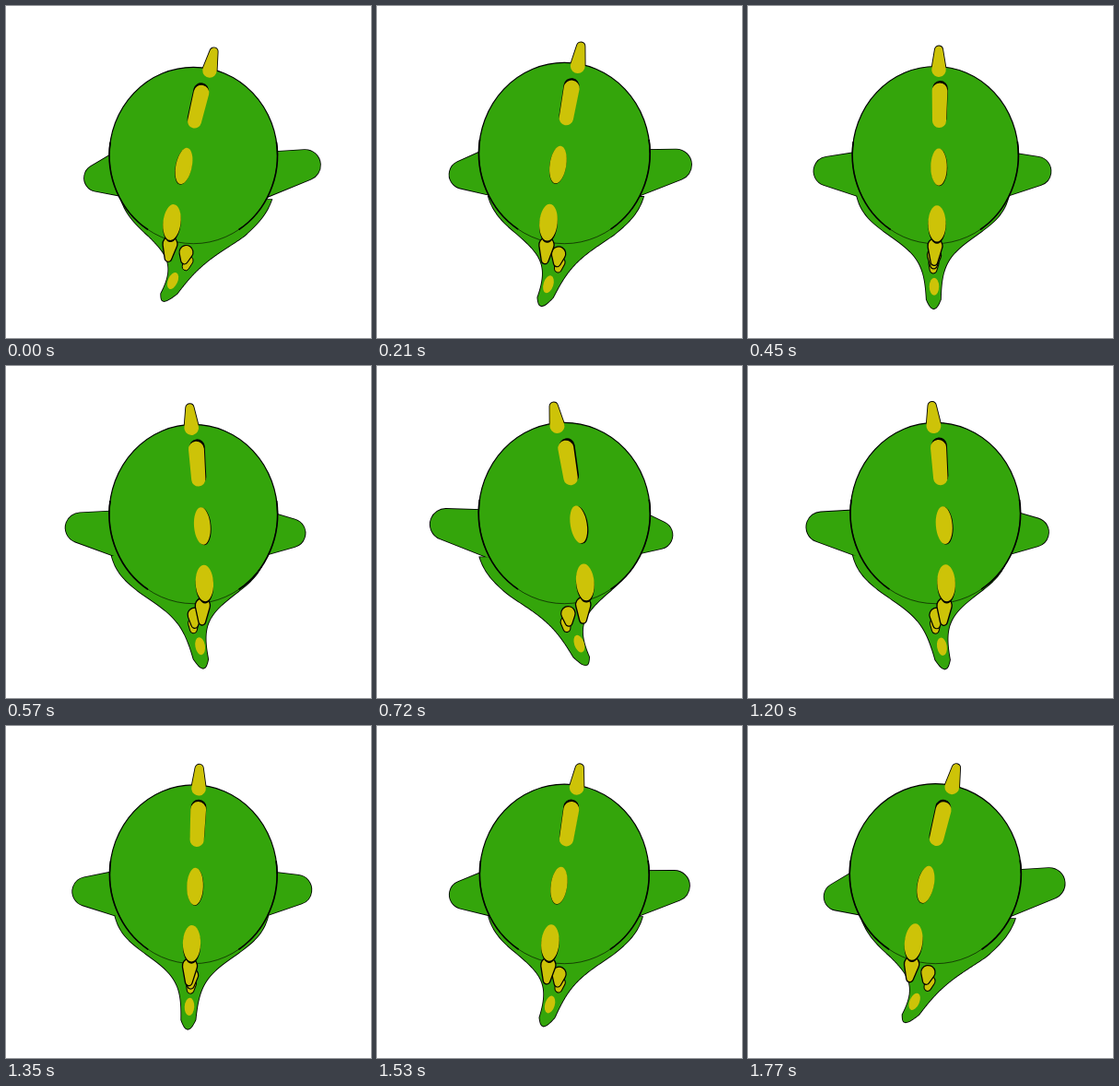
These frames come from a looping animation (396 px wide and 360 px high, 1.9 s). An HTML page with a canvas:

```html
<!DOCTYPE html>
<html>
<head>
<meta charset="utf-8">
<style>
html, body { margin: 0; width: 100%; height: 100%; overflow: hidden; background: #fff; }
canvas { display: block; }
</style>
</head>
<body>
<canvas id="stage" width="396" height="360"></canvas>
<script>
const ctx = document.getElementById('stage').getContext('2d');
const GREEN = '#34a50b', YELLOW = '#cdc308', BLACK = '#000';
const { PI, sin, cos, sqrt, abs, min, max, exp } = Math;

// Turn of the body: 1 is right, -1 is left.
let turn = 1;

// Place of a point on the back: x moves with the turn, y with its square.
const onBack = (x, y, swing, drop = 0) => [x + swing * turn, y + drop * turn * turn];

// Hull of two circles.
function taper([x1, y1], r1, [x2, y2], r2) {
  const dir = Math.atan2(y2 - y1, x2 - x1);
  const open = Math.acos((r1 - r2) / Math.hypot(x2 - x1, y2 - y1));
  const path = new Path2D();
  path.arc(x1, y1, r1, dir + open, dir - open + 2 * PI);
  path.arc(x2, y2, r2, dir - open, dir + open);
  path.closePath();
  return path;
}

function oval([x, y], rx, ry, tilt = 0, from = 0, to = 2 * PI) {
  const path = new Path2D();
  path.ellipse(x, y, rx, ry, tilt * turn, from, to);
  return path;
}

function fin(side) {
  const k = side * turn, x = d => 200 + side * d;
  return taper([x(70), 183 + 2 * k], 25.5, [x(112.5 + 12 * k), 179.5 - 7 * k], 15.5 + k);
}

// Hips narrow into the tail, which bends against the turn.
function tail() {
  const path = new Path2D(), sq = turn * turn;
  const edge = (side, y) => {
    const wide = 7 + (78.5 + 3 * sq) / (1 + exp((y - 249) / (14 + 4 * sq)));
    const bend = max(0, (y - 245) / 83) ** 1.3;
    const half = wide * sqrt(min(1, (328 - y) / 10));
    path.lineTo(200.5 + side * half + turn * (6 - 36 * bend) + bend, y + sq * (4 - 12 * bend));
  };
  for (let y = 206; y <= 328; y++) edge(1, y);
  for (let y = 328; y >= 206; y--) edge(-1, y);
  path.closePath();
  return path;
}

function fill(path, color) {
  ctx.fillStyle = color;
  ctx.fill(path);
}

function stroke(path, width) {
  ctx.lineWidth = width;
  ctx.strokeStyle = BLACK;
  ctx.stroke(path);
}

function shaded(path, dx, dy) {
  ctx.save();
  ctx.translate(dx, dy);
  fill(path, BLACK);
  ctx.restore();
  fill(path, YELLOW);
}

function outlined(path, width) {
  fill(path, YELLOW);
  stroke(path, width);
}

function drawBody() {
  const parts = [tail(), fin(1), fin(-1)];
  const horn = taper([207 + 18.5 * turn, 48.5 + turn * turn], 4.2, [207 + 14 * turn, 70], 7.7);
  for (const part of [...parts, horn]) stroke(part, 1.7);
  for (const part of parts) fill(part, GREEN);

  const torso = (from, to) => oval([203.3, 162], 89.7 + 1.5 * turn * turn, 95.7, 0, from, to);
  fill(torso(), GREEN);
  stroke(torso(0, PI), .6);
  stroke(torso(PI, 2 * PI), 1.2);
  stroke(torso(-.15, 1), 1.6);
  stroke(torso(PI - 1, PI + .15), 1.6);
  fill(horn, YELLOW);
}

function drawSpines() {
  const lean = .5 - .9 * turn;
  shaded(taper(onBack(208, 92.5, 4, 1.5), 8.3, onBack(207.5, 125, -3), 7.5), lean, -2.4);
  shaded(oval(onBack(207, 175, -14, -1.5), 8.7, 20, .2), lean, .5);
  fill(oval(onBack(202, 304, -21, -6), 5.2, 9.5, .42), YELLOW);
  outlined(taper(onBack(201.5, 279, -4, -3), 5.5, onBack(201, 286, -6, -3), 3.8), 1);
  outlined(taper(onBack(202, 270, -6.5, -3), 7.5, onBack(201.5, 281, -8, -5), 3.8), 1.2);
  outlined(taper(onBack(203, 260, -25, -2), 8, onBack(202, 277.5, -26, -4), 3.8), 1.3);
  shaded(oval(onBack(205, 236, -25, -1.5), 9.5, 19.5, .12), 0, 2.2);
}

function draw(t) {
  // The way back runs slightly ahead of an even swing.
  const phase = 2 * PI * t / 1800;
  turn = cos(phase - .14 * min(0, sin(phase)));
  const size = 1 + .026 * abs(sin(PI * t / 475));

  ctx.setTransform(1, 0, 0, 1, 0, 0);
  ctx.fillStyle = '#fff';
  ctx.fillRect(0, 0, 396, 360);
  ctx.translate(203, 258);
  ctx.scale(size, size);
  ctx.translate(-203, -258);
  drawBody();
  drawSpines();
}

const start = performance.now();
function tick(now) {
  const t = max(0, now - start) % 1900;
  draw(min(1770, Math.floor(t / 30) * 30));
  requestAnimationFrame(tick);
}
draw(0);
requestAnimationFrame(tick);
</script>
</body>
</html>
```
